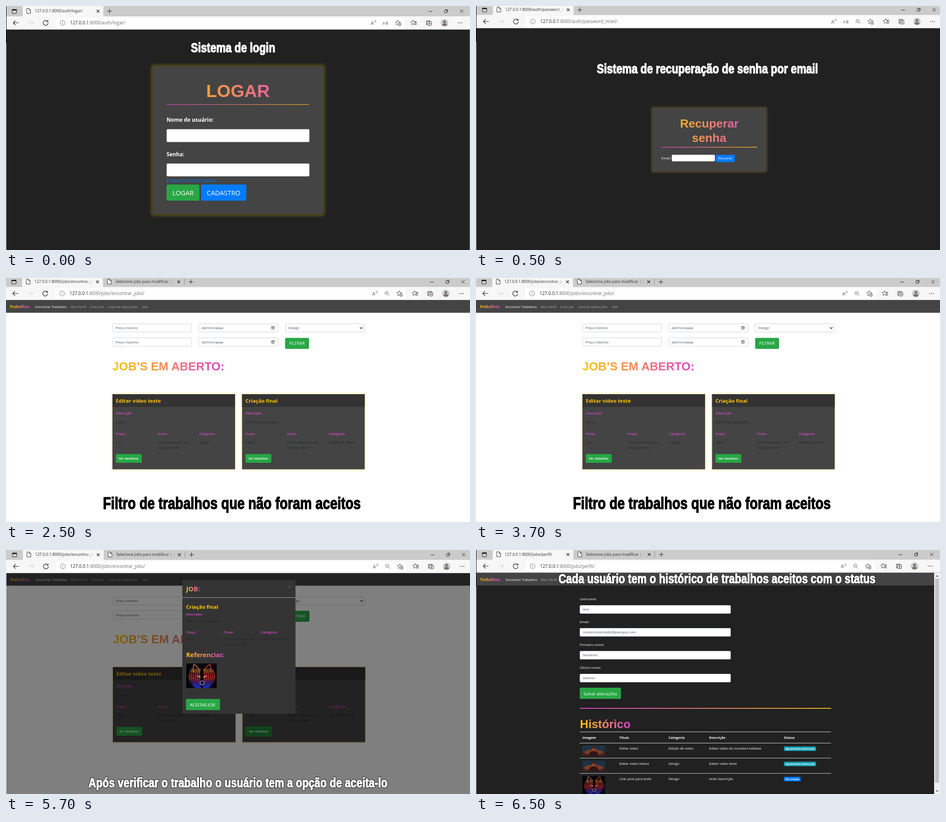
An HTML page that plays this animation: 1029x544 px, repeating every 8000 ms.

```html
<!DOCTYPE html>
<html lang="pt-BR">
<head>
<meta charset="utf-8">
<title>Sistema de jobs</title>
<style>
html, body { margin: 0; width: 100%; height: 100%; overflow: hidden; background: #212121; }
svg { display: block; font-family: "Open Sans", "Noto Sans", sans-serif; }
#stage { width: 1029px; height: 544px; }
.arial { font-family: "Liberation Sans", Arial, sans-serif; font-weight: 700; }
/* Each scene is opaque and covers the earlier ones once it appears. */
.scene { animation: 8s step-end infinite; }
#recover { animation-name: at500; }
#jobs { animation-name: at2500; }
#modal { animation-name: at4500; }
#profile { animation-name: at6500; }
@keyframes at500 { 0% { opacity: 0 } 6.25%, 100% { opacity: 1 } }
@keyframes at2500 { 0% { opacity: 0 } 31.25%, 100% { opacity: 1 } }
@keyframes at4500 { 0% { opacity: 0 } 56.25%, 100% { opacity: 1 } }
@keyframes at6500 { 0% { opacity: 0 } 81.25%, 100% { opacity: 1 } }
</style>
</head>
<body>
<svg id="stage" viewBox="0 0 1029 544"></svg>
<script>
const DARK = '#212121', CARD = '#444', GREEN = '#28a745', BLUE = '#007bff';
const PINK = '#dc48cf', GOLD = '#ffc107';
const defs = [];

const box = (x, y, w, h, fill, r = 0, extra = '') =>
  `<rect x="${x}" y="${y}" width="${w}" height="${h}" rx="${r}" fill="${fill}" ${extra}/>`;
const txt = (x, y, s, size, fill = '#fff', weight = 400, extra = '') =>
  `<text x="${x}" y="${y}" font-size="${size}" fill="${fill}" font-weight="${weight}" ${extra}>${s}</text>`;
const path = (d, color = '#222', w = 1, fill = 'none') =>
  `<path d="${d}" fill="${fill}" stroke="${color}" stroke-width="${w}"/>`;
const circle = (x, y, r, fill, stroke = 'none') =>
  `<circle cx="${x}" cy="${y}" r="${r}" fill="${fill}" stroke="${stroke}"/>`;
const move = (x, y, s) => `<g transform="translate(${x} ${y})">${s}</g>`;
const big = (x, y, s, size, fill) => txt(x, y, s, size, fill, 700, 'class="arial"');

// Horizontal gradient in user space; returns its paint reference.
function fade(x1, x2, from = '#ffc800', to = '#dc40d0') {
  const id = 'g' + defs.length;
  const end = to === 'none' ? `stop-color="${from}" stop-opacity="0"` : `stop-color="${to}"`;
  defs.push(`<linearGradient id="${id}" gradientUnits="userSpaceOnUse" x1="${x1}" x2="${x2}" y1="0" y2="0">
    <stop stop-color="${from}"/><stop offset="1" ${end}/></linearGradient>`);
  return `url(#${id})`;
}
const rule = (x, y, w, h) => box(x, y, w, h, fade(x, x + w, '#d63fc4', '#e8b818'));

// Heavy condensed caption face.
function caption(x, y, s, size, fill, outlined) {
  const layer = (color, w) => `<text class="arial" font-size="${size}" fill="${color}" stroke="${color}"
    stroke-width="${w}" stroke-linejoin="round" transform="translate(${x} ${y}) scale(.79 1)">${s}</text>`;
  return (outlined ? layer('#111', 3.6) : '') + layer(fill, 1.5);
}

function glow(x, y, w, h, spread, alpha) {
  let s = '';
  for (let e = spread; e > 0; e--)
    s += box(x - e, y - e, w + 2 * e, h + 2 * e, GOLD, e + 4, `opacity="${alpha}"`);
  return s;
}

const button = (x, y, w, h, s, tx, ty, size, fill = GREEN, weight = 400) =>
  box(x, y, w, h, fill, h / 10) + txt(tx, ty, s, size, '#fff', weight);
const field = (x, y, w, h, s = '', size = 7.6) =>
  box(x + .5, y + .5, w - 1, h - 1, '#fff', 2, 'stroke="#ced4da"') + txt(x + 7, y + h / 2 + 2.8, s, size, '#495057');

const cross = (x, y, r, w) => path(`M${x - r} ${y - r}l${2 * r} ${2 * r}m0 ${-2 * r}l${-2 * r} ${2 * r}`, '#222', w);
const star = (x, y) => {
  let d = '';
  for (let i = 0; i < 10; i++) {
    const r = i % 2 ? 2.6 : 6, a = i * Math.PI / 5 - Math.PI / 2;
    d += `${i ? 'L' : 'M'}${(x + r * Math.cos(a)).toFixed(1)} ${(y + r * Math.sin(a)).toFixed(1)}`;
  }
  return path(d + 'Z', '#555');
};
const sheet = x => path(`M${x - 4} 5.5h5l3.5 3.5v7.5h-8.5zM${x + 1} 5.5v3.5h3.5`, '#333', 1, '#fff');

const tab = (x, s) => sheet(x + 13)
  + txt(x + 27, 14, s, 8.55, fade(x + 140, x + 158, '#2b2b2b', 'none')) + cross(x + 167, 11.5, 3, 1.1);

function browser({ x = 0, y = 0, dx = 0, url, second, zoom, translate }) {
  const host = '127.0.0.1', rest = ':8000/' + url;
  let s = box(-5, -5, 1045, 29, '#cbcbcb') + box(-5, 23, 1045, 29.5, '#f7f7f7')
    + '<path d="M37 24V-5H216V24z" fill="#f7f7f7"/>'
    + box(110, 26, 774 + dx, 23, '#fff', 3)
    + box(13.5, 7.5, 10, 9, 'none', 1.5, 'stroke="#222"') + box(13.5, 7, 10, 3, '#222')
    + tab(37, host + rest);
  let plus = 229.5;
  if (second) {
    s += tab(217, second) + path('M396.5 4v14', '#888');
    plus = 411;
  }
  s += path(`M${plus - 5} 11.5h10m-5-5v10`)
    + path('M28 37.5H16m5-5l-5 5l5 5', '#222', 1.2)
    + path('M49 37.5h12m-5-5l5 5l-5 5', '#ccc')
    + path('M92.5 34.5A5.5 5.5 0 1 0 93.5 38M93 31.5v3.5h-4', '#222', 1.2)
    + circle(125.5, 37.5, 5.5, 'none', '#777') + path('M125.5 36.5v4m0-6v1.2', '#777')
    + txt(142, 41, `${host}<tspan fill="#6b6b6b">${rest}</tspan>`, 9.9, '#222');
  let icons = star(869, 37.5) + circle(873, 41, 3.2, '#fff', '#444') + path('M871.5 41h3m-1.5-1.5v3', '#444', .8)
    + star(903, 37) + path('M906 35h5m-4 3h4m-4 3h4')
    + path('M934 41.5h-1.5v-8.5h8v2') + box(935, 35, 8.5, 8, '#f7f7f7', 1.5, 'stroke="#222"') + path('M939.2 37v4m-2-2h4')
    + circle(972.5, 37.5, 8.5, '#cfcdca') + circle(972.5, 35, 3, '#77736f')
    + '<path d="M967 43q0-4.5 5.5-4.5t5.5 4.5q-5.5 3.5-11 0z" fill="#77736f"/>'
    + [1003, 1007, 1011].map(cx => circle(cx, 37.5, .9, '#222')).join('')
    + path('M937.5 12h8') + box(972.5, 9.5, 5.5, 5.5, 'none', 1, 'stroke="#222"') + path('M974.5 8h5v5.5')
    + cross(1010.5, 11.5, 3.5, 1);
  let at = 842;
  if (zoom) {
    icons += circle(at - 1, 36.5, 3.8, 'none', '#777') + path(`M${at + 2} 39.5l3.5 3.5M${at - 3} 36.5h4`, '#777');
    at -= 27;
  }
  if (translate) {
    icons += txt(at - 7, 41, 'a', 9, '#555')
      + txt(at - 1, 41, 'あ', 7.5, '#555', 400, 'font-family="Noto Sans CJK JP, Noto Sans CJK, sans-serif"');
    at -= 27;
  }
  icons += txt(at - 6, 41.5, 'A', 11, '#666') + path(`M${at + 2} 33q1.5 1.5 0 3m2-5q3 3 0 6`, '#666', .9);
  return move(x, y, s + move(dx, 0, icons));
}

const edge = (black = 82) => box(0, 0, 1, black, '#000') + box(0, black, 1, 544 - black, '#aaa');

function login() {
  return box(0, 0, 1029, 544, DARK) + browser({ url: 'auth/logar/', translate: true }) + edge()
    + box(1028, 52, 1, 492, '#777')
    + caption(410, 102.5, 'Sistema de login', 29.8, '#fff')
    + glow(326, 135, 377, 329, 8, .026) + box(326, 135, 377, 329, CARD)
    + big(444, 202.5, 'LOGAR', 39, fade(356, 672)) + rule(356, 219, 316, 1.2)
    + txt(356, 258, 'Nome de usuário:', 11.8, '#fff', 700) + field(356, 274.5, 317, 29)
    + txt(356, 334.5, 'Senha:', 11.8, '#fff', 700) + field(356, 351, 317, 29)
    + txt(356, 393, 'Esqueci minha senha', 11.25, BLUE)
    + button(356, 398, 73, 36, 'LOGAR', 369, 421.5, 14.5)
    + button(432.5, 398, 100.5, 36, 'CADASTRO', 445, 421.5, 14.7, BLUE);
}

function recover() {
  return box(0, 0, 1029, 544, DARK)
    + browser({ x: .5, y: -3, dx: 5, url: 'auth/password_reset/', zoom: true, translate: true }) + edge(80)
    + caption(268, 149.5, 'Sistema de recuperação de senha por email', 29.8, '#fff')
    + glow(391, 227, 252.5, 142, 5, .034) + box(391, 227, 252.5, 142, CARD)
    + big(452.5, 270.5, 'Recuperar', 26.3, fade(411, 624)) + big(479, 302.5, 'senha', 26.3, fade(411, 624))
    + rule(411, 314, 212.5, 1.5)
    + txt(411, 341.7, 'Email:', 7.6) + field(434, 331.5, 96, 15)
    + button(532, 332, 42, 16, 'Recuperar', 537, 342.4, 6.7, BLUE);
}

const nav = (x, y) => box(0, 49 + y, 1029, 28.5, CARD) + move(x, y,
  txt(8, 67.3, 'Trabalhos', 9.1, fade(8, 53), 700)
  + txt(65, 67, 'Encontrar Trabalhos', 7.45)
  + [[143, 'Meu Perfil'], [187, 'Criar Job'], [226.5, 'Lista de todos Jobs'], [302, 'Sair']]
    .map(([tx, s]) => txt(tx, 67, s, 7.45, '#a8a8a8')).join(''));

// Labelled job details; gap is the distance between the columns.
function details(x, y, gap, rows, values) {
  const ink = '#212529';
  const label = (tx, ty, s) => txt(tx, ty, s, 7.45, PINK, 600);
  let s = label(x, y, 'Descrição:') + txt(x, y + rows[0], values[0], 7.55, ink);
  ['Preço:', 'Prazo:', 'Categoria:'].forEach((name, i) => {
    s += label(x + i * gap, y + rows[1], name);
    values[i + 1].split('|').forEach((v, k) => {
      s += txt(x + i * gap, y + rows[2] + k * 12, v, 7.55, ink);
    });
  });
  return s;
}

const DATE = '15 de Dezembro de|2022 às 00:00';
const FINAL = ['teste final do projeto', '100,0', DATE, 'Edição de video'];

const jobCard = (x, title, values) => glow(x, 259, 272, 167.5, 5, .04)
  + box(x, 259, 272, 167.5, CARD) + box(x, 259, 272, 28.5, '#333')
  + txt(x + 7.5, 278, title, 11.4, GOLD, 700)
  + details(x + 7.5, 304, 92.5, [20, 45.5, 65], values)
  + button(x + 7.5, 392.5, 57.5, 19.5, 'Ver detalhes', x + 14, 405, 7.25, GREEN, 600);

function jobList() {
  const picker = y => field(427, y, 177, 19.5, 'dd/mm/aaaa', 7.9)
    + box(589, y + 6.5, 6, 6, 'none', 1, 'stroke="#444"') + path(`M589 ${y + 8.5}h6m-4 2.2h2`, '#444');
  return field(236, 101.5, 176, 19.5, 'Preço mínimo') + field(236, 133, 176, 19.5, 'Preço máximo')
    + picker(101.5) + picker(133)
    + field(619, 101.5, 176.5, 19.5, 'Design', 7.8) + path('M785 110l2.7 2.7l2.7-2.7', '#222', 1.4)
    + button(619, 133.5, 53, 24.5, 'FILTRAR', 628, 149, 9.35)
    + big(236, 206, 'JOB’S EM ABERTO:', 26, fade(236, 486))
    + jobCard(236, 'Editar video teste', ['preco', '15,0', DATE, 'Design'])
    + jobCard(523.5, 'Criação final', FINAL);
}

const jobsBar = { url: 'jobs/encontrar_jobs/', dx: 4, zoom: true, second: 'Selecione jobs para modificar | Site' };

function jobs() {
  return box(0, 0, 1029, 544, '#fff') + browser({ ...jobsBar, x: -1, y: -3 })
    + nav(0, 0) + jobList()
    + caption(215, 514.5, 'Filtro de trabalhos que não foram aceitos', 36.9, '#000');
}

// Neon wolf on black: mirrored fur strokes, warm on top and blue below.
function wolf(w, h) {
  const fur = ['#c8742c', '#c0242a', '#d02c2c', '#7a2a8c', '#3038d8', '#2830c0'];
  let s = box(0, 0, 68, 55, '#05050a');
  for (let i = 0; i < 66; i++) {
    const row = i % 11, k = Math.floor(i / 11) + 1;
    const y = 11 + row * 4, x = k * (2 + 2.4 * Math.sin((row + 3) / 13 * Math.PI)), tone = Math.floor(row / 2);
    for (const side of [-1, 1])
      s += path(`M${(35 + side * x).toFixed(1)} ${y}q${side} 4 ${side * 3} 7`, fur[tone], 1.3);
  }
  return `<svg width="${w}" height="${h}" viewBox="0 0 68 55" preserveAspectRatio="none">${s}
    ${path('M17 20q-3-10 0-18q8 4 12 12', '#d9853c', 1.4)}${path('M53 20q3-10 0-18q-8 4-12 12', '#c8502c', 1.4)}
    ${path('M24 27l8 4M46 27l-8 4', '#f2c7a4', 1.5)}${circle(35.5, 43, 4.5, '#10101a', '#e8dcea')}</svg>`;
}

function modal() {
  return box(0, 0, 1029, 544, '#fff') + nav(1, 2) + move(1, 2, jobList())
    + button(530, 393, 60, 23, 'Ver detalhes', 538.5, 407, 7.25, '#218838', 600)
    + box(0, 51, 1029, 493, '#000', 0, 'opacity=".5"')
    + browser({ ...jobsBar, x: .5, y: -1 }) + box(0, 51, 1, 493, '#ddd')
    + box(391, 67, 251, 298, '#343434', 2)
    + txt(399.5, 92, 'JOB:', 14.6, fade(399, 432), 700)
    + box(626.5, 79.5, 5, 5, 'none', 0, 'stroke="#666" stroke-dasharray="2 1.5"')
    + box(391, 105.5, 251, 1, '#aaa')
    + txt(399.5, 131, 'Criação final', 11.35, '#ffc800', 700)
    + details(399.5, 146, 83, [15, 39.5, 55], FINAL)
    + txt(399.5, 238.5, 'Referencias:', 13.9, fade(399, 485), 700)
    + move(399.5, 253, wolf(68, 55))
    + button(399, 332, 75.5, 25, 'ACEITAR JOB', 408, 348.5, 9.7)
    + caption(183, 528.5, 'Após verificar o trabalho o usuário tem a opção de aceita-lo', 29.5, '#fff', true);
}

// Soft picture: dusk sky, warm glow and a plain silhouette.
const portrait = box(0, 0, 50, 23, '#1c3444') + box(0, 15, 50, 8, '#4a2119')
  + '<ellipse cx="25" cy="15" rx="21" ry="6" fill="#7c3a26"/>'
  + '<path d="M13 23q2-10 12-11 10 1 12 11z" fill="#2c1816"/>'
  + '<ellipse cx="25" cy="8" rx="4" ry="5" fill="#8a4429"/><path d="M17 6h16l-4-4h-8z" fill="#3a211c"/>';

function profile() {
  const form = [['Username:', 'leco'], ['Email:', 'norbertocacto482@exemplo.com'],
    ['Primeiro nome:', 'Norberto'], ['Último nome:', 'Valdrini']];
  const cols = [236, 318, 427, 517, 683];
  const wait = 'Aguardando aprovação';
  const rows = [['Editar video', 'Edição de vídeo', 'Editar video do mundovi editada', wait],
    ['Editar video teste2', 'Design', 'Editar video teste', wait],
    ['criar post para teste', 'Design', 'teste descrição', 'Em criação']];
  let s = box(0, 0, 1029, 544, DARK) + browser({ y: -1.5, url: 'jobs/perfil/', zoom: true, second: jobsBar.second })
    + nav(1, 1.5) + edge(80);
  form.forEach(([label, value], i) => {
    const y = i * 51;
    s += txt(230, 111.5 + y, label, 7.5) + field(230, 123 + y, 335, 19, value);
  });
  s += button(230, 307, 91.5, 25, 'Salvar alterações', 238.5, 323.5, 9.45)
    + rule(230, 352, 557.5, 2) + big(230.5, 397, 'Histórico', 25.9, fade(230, 343))
    + [405, 430, 463.5, 497.5].map(y => box(230, y, 557.5, 1, '#d5d8db')).join('');
  ['Imagem', 'Título', 'Categoria', 'Descrição', 'Status'].forEach((name, i) => {
    s += txt(cols[i], 420.7, name, 7.45, '#fff', 700);
  });
  rows.forEach((row, i) => {
    const y = i * 33.9, pending = row[3] === wait;
    s += move(236, 436 + y, pending ? portrait : wolf(50, 41));
    row.slice(0, 3).forEach((cell, k) => { s += txt(cols[k + 1], 445 + y, cell, 7.6); });
    s += box(683, 438 + y, pending ? 71 : 37, 10, pending ? '#17a2b8' : BLUE, 2)
      + txt(686, 445.2 + y, row[3], 5.7, '#fff', 700);
  });
  return s + box(1016, 50.5, 13, 494, '#f1f1f1') + box(1018, 64, 9, 455, '#c4c4c4')
    + '<path d="M1019.5 59.5l3-3.5 3 3.5zM1019.5 536l3 3.5 3-3.5z" fill="#666"/>'
    + caption(183, 73.5, 'Cada usuário tem o histórico de trabalhos aceitos com o status', 29.5, '#fff', true);
}

const scenes = Object.entries({ login, recover, jobs, modal, profile })
  .map(([id, draw]) => `<g class="scene" id="${id}">${draw()}</g>`).join('');
document.getElementById('stage').innerHTML = `<defs>${defs.join('')}</defs>${scenes}`;
</script>
</body>
</html>
```
